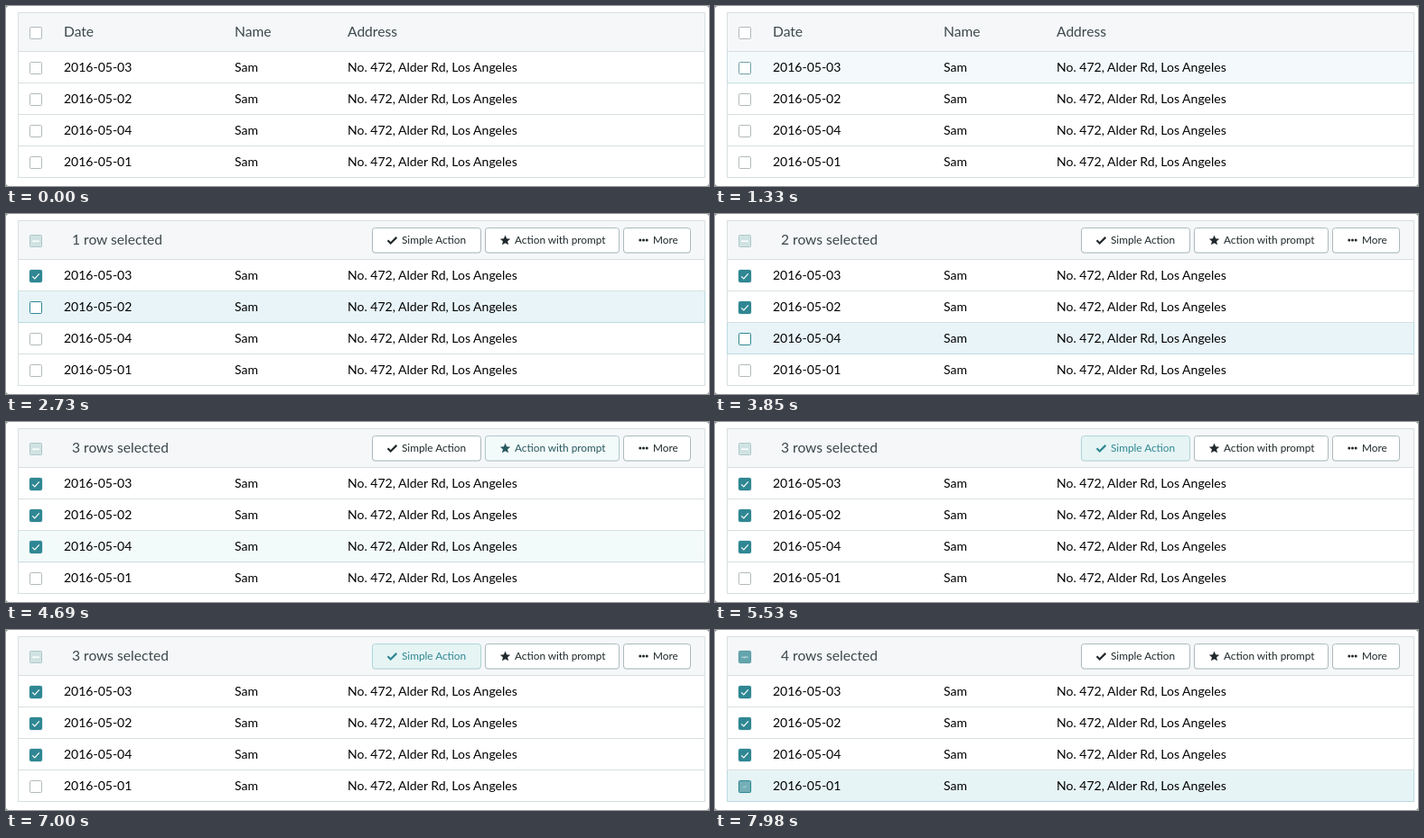
These frames come from a looping animation (778x200 px, 8000 ms). An HTML page:

```html
<!DOCTYPE html>
<html lang="en">
<head>
<meta charset="utf-8">
<title>Table with bulk actions</title>
<style>
  html, body { margin: 0; width: 100%; height: 100%; overflow: hidden; background: #fff; }
  svg { display: block; font: 14px Lato, "Open Sans", sans-serif; }
  .head { font-size: 15.6px; fill: #3b474a; }
  .button { font-size: 11.8px; }
</style>
</head>
<body>
<svg id="stage" width="778" height="200" viewBox="0 0 778 200"></svg>
<script>
const LOOP = 8000, STEP = 70;
const TEAL = '#2f8793', LINE = '#d8dfe0', BOX_LINE = '#b2babc';
const HOVER = '#e8f4f8', HOVER_CHECKED = '#e6f4f4', HOVER_LINE = '#bcdbe2';
const stage = document.getElementById('stage');

// hover: fade in from a to b, fade out from c to d; check: start of the selection
const rows = [
  { date: '2016-05-03', hover: [1190, 1470, 2450, 2520], check: 1820, label: 1820 },
  { date: '2016-05-02', hover: [2660, 2730, 3570, 3640], check: 3220, label: 3220 },
  { date: '2016-05-04', hover: [3710, 3850, 4620, 4760], check: 4410, label: 4340 },
  { date: '2016-05-01', hover: [7490, 7630, LOOP, LOOP + 1], check: 7840, label: 7840 }
];
const star = Array.from({ length: 10 }, (_, i) => {
  const r = i % 2 ? 2.7 : 6, a = i * Math.PI / 5;
  return `${(552.5 + r * Math.sin(a)).toFixed(2)},${(29.5 - r * Math.cos(a)).toFixed(2)}`;
}).join(' ');
const buttons = [
  { x: 405, w: 121, label: 'Simple Action', hover: [5180, 5460, 7210, 7420],
    icon: c => `<path d="M422.5 29.3l3.2 3.2 6.6-6.6" fill="none" stroke="${c}" stroke-width="2.2"/>` },
  { x: 530, w: 149, label: 'Action with prompt', hover: [4620, 4760, 4830, 5110],
    icon: c => `<polygon points="${star}" fill="${c}"/>` },
  { x: 683, w: 75, label: 'More', hover: [LOOP, LOOP + 1, LOOP, LOOP + 1],
    icon: c => [701.8, 705.5, 709.2].map(x => `<circle cx="${x}" cy="29" r="1.5" fill="${c}"/>`).join('') }
];

const ramp = (t, a, b) => Math.min(1, Math.max(0, (t - a) / (b - a)));
const pulse = (t, [a, b, c, d]) => ramp(t, a, b) - ramp(t, c, d);
const mix = (from, to, p) => `color-mix(in srgb, ${to} ${Math.round(p * 100)}%, ${from})`;
const text = (x, y, s, attrs = '') => `<text x="${x}" y="${y}" ${attrs}>${s}</text>`;
const rect = (x, y, w, h, fill, attrs = '') =>
  `<rect x="${x}" y="${y}" width="${w}" height="${h}" fill="${fill}" ${attrs}/>`;
const rule = (y, color) => `<path d="M13 ${y}H774" stroke="${color}"/>`;

function box(y, fill, border, glow) {
  return rect(25.5, y - 1, 15, 15, 'none', `rx="2.5" stroke="${TEAL}" opacity="${0.12 * glow}"`) +
    rect(26.5, y, 13, 13, fill, `rx="1" stroke="${border}"`);
}

function tick(y, p) {
  return p ? `<path d="M-3.8 .3L-1.2 2.9 3.8-2.6" transform="translate(33 ${y + 6.5}) scale(${p * p})"
    fill="none" stroke="#fff" stroke-width="1.2"/>` : '';
}

function header(t) {
  const count = rows.filter(r => t >= r.label).length;
  const some = ramp(t, rows[0].check, rows[0].check + 210);
  const all = ramp(t, rows[3].check, rows[3].check + 210);
  let s = box(23.5, mix(mix('#fff', '#d0e3e3', some), TEAL, all),
    mix(mix(BOX_LINE, '#aec8c8', some), TEAL, all), all);
  s += rect(29, 29.5, 8, 1.5, '#fff', `opacity="${some * (1 - all)}"`) + tick(23.5, all);
  if (!count) {
    return s + [[64, 'Date'], [253, 'Name'], [378, 'Address']]
      .map(([x, label]) => text(x, 34.2, label, 'class="head"')).join('');
  }
  s += text(73, 34.2, `${count} row${count > 1 ? 's' : ''} selected`, 'class="head"');
  return s + buttons.map(b => {
    const p = pulse(t, b.hover), color = mix('#20292c', TEAL, p);
    return rect(b.x + .5, 16, b.w - 1, 28, '#dfe6e8', 'rx="3"') +
      rect(b.x + .5, 15.5, b.w - 1, 27.5, mix('#fff', '#e6f4f4', p),
        `rx="3" stroke="${mix('#adb9bd', '#b0d5d7', p)}"`) +
      b.icon(color) + text(b.x + 33, 33, b.label, `class="button" fill="${color}"`);
  }).join('');
}

function row(r, i, t) {
  const y = 51 + 35 * i, p = pulse(t, r.hover);
  const checked = ramp(t, r.check, r.check + 210);
  const outline = `<path d="M13.5 ${y}v34.5h760v-34.5" fill="none" stroke="${HOVER_LINE}" opacity="${p}"/>`;
  return rect(14, y, 759, 34, mix('#fff', mix(HOVER, HOVER_CHECKED, checked), p)) +
    (p ? outline : '') +
    box(y + 11.5, mix('#fff', TEAL, checked), mix(BOX_LINE, TEAL, Math.max(p, checked)), checked) +
    tick(y + 11.5, checked) +
    text(64, y + 22.2, r.date) + text(253, y + 22.2, 'Sam') +
    text(378, y + 22.2, 'No. 472, Alder Rd, Los Angeles');
}

function render(t) {
  stage.innerHTML = rect(0, 0, 778, 200, '#8a8e90') + rect(0, 0, 778, 200, '#fff', 'rx="3.5"') +
    rect(13.5, 7.5, 760, 183, '#fff', `stroke="${LINE}"`) +
    rect(14, 8, 759, 42, '#f5f7f9') +
    [50.5, 85.5, 120.5, 155.5].map(y => rule(y, LINE)).join('') +
    header(t) + rows.map((r, i) => row(r, i, t)).join('');
}

let shown = -1;
function frame() {
  const step = Math.floor(performance.now() % LOOP / STEP);
  if (step !== shown) render((shown = step) * STEP);
  requestAnimationFrame(frame);
}
frame();
</script>
</body>
</html>
```
